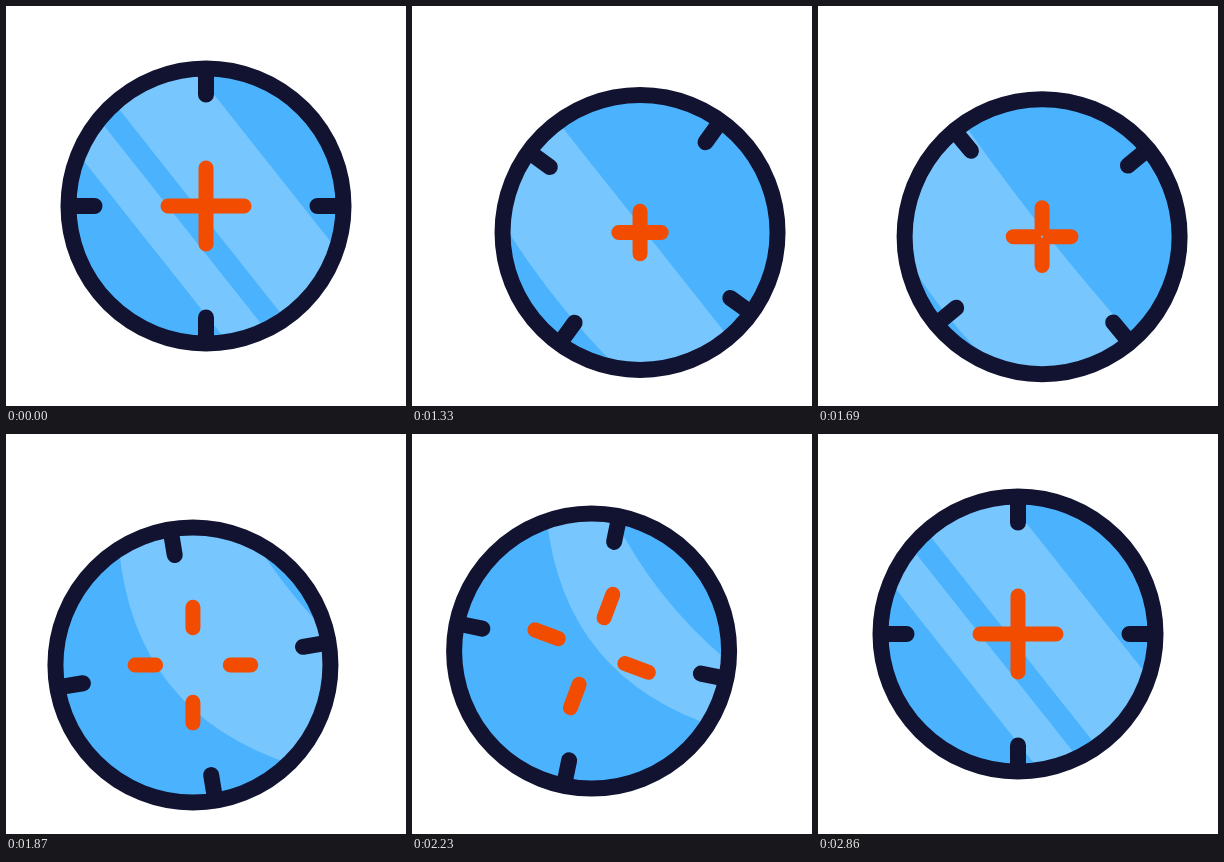
Write an HTML page that moves like this. It is 400 px wide and 400 px high and loops after 2950 ms.

```html
<!DOCTYPE html>
<html lang="en">
<head>
<meta charset="utf-8">
<title>Crosshair</title>
<style>
  html, body { margin: 0; width: 100%; height: 100%; overflow: hidden; background: #fff; }
  svg { display: block; width: 100%; height: 100%; }
  .glass { fill: #4bb3fd; }
  .light { fill: #78c6fe; }
  .ring, .tick { fill: none; stroke: #121331; stroke-width: 16; stroke-linecap: round; }
  .dash { fill: none; stroke: #f24c00; stroke-width: 15; stroke-linecap: round; }
</style>
</head>
<body>
<svg viewBox="0 0 400 400">
  <defs><clipPath id="lens"><circle r="133"/></clipPath></defs>
  <g id="scope">
    <circle class="glass" r="133"/>
    <g clip-path="url(#lens)">
      <g transform="rotate(-38.4)">
        <path id="narrow" class="light"/>
        <path id="wide" class="light"/>
      </g>
    </g>
    <circle class="ring" r="137.5"/>
    <path id="ticks" class="tick" d="M0-137V-111.5M0 137V111.5M-137 0H-111.5M137 0H111.5"/>
    <path id="cross" class="dash"/>
  </g>
</svg>
<script>
const LOOP = 2950, START = 1030, STEP = 30, LAST = 2860;

// Three eased legs: aim right, sweep left, return.
// Each property follows a Bezier curve through its control values.
const legs = [
  {
    from: 1000, to: 1450, ease: [1, 1.5],
    x: [200, 209, 231, 228.2], y: [200, 207.5, 226, 228.2],
    inner: [0], length: [38, 33.7, 20.5, 20.5],
    spin: [0, 41.7], turn: [0],
    slide: [0, 0, -60, -145],
    left: [-8, -8, -34, -150], right: [75.5, 75.5, 62, -29],
    bowL: [0, 12], bowR: [0]
  },
  {
    from: 1500, to: 2080, ease: [2.9, 4.75],
    x: [228.2, 225, 192.4, 172], y: [228.2, 233.5, 235.8, 226.4],
    inner: [0, 48], length: [20.5],
    spin: [41.7, 91.7], turn: [0],
    slide: [-145],
    left: [-150, 4], right: [-29, 28, 144, 130],
    bowL: [12, 18, 54], bowR: [0, 20]
  },
  {
    from: 2080, to: 2860, ease: [1.8, 5.7],
    x: [172, 182, 191, 200], y: [226.4, 212.5, 207, 200],
    inner: [48, 0], length: [20.5, 38],
    spin: [91.7, 102, 180], turn: [0, 37.5, 90],
    slide: [-145, 0],
    left: [4, 10, -8], right: [130, 60, 75.5, 75.5],
    bowL: [54, 0], bowR: [20, 20, 0]
  }
];

const byId = id => document.getElementById(id);
const [scope, ticks, cross, narrow, wide] =
  ['scope', 'ticks', 'cross', 'narrow', 'wide'].map(byId);

// Slow start grows with a, slow finish grows with b
const ease = (u, [a, b]) => 1 - (1 - u ** a) ** b;

function bezier(points, p) {
  if (points.length === 1) return points[0];
  const next = points.slice(1).map((v, i) => points[i] + (v - points[i]) * p);
  return bezier(next, p);
}

// Upright band whose sides bend by bow at a distance of 129 from the middle
function band(left, right, bowL = 0, bowR = 0) {
  const s = 140, bend = (s / 129) ** 2;
  const side = (m, bow, dir) =>
    `${m + bow * bend} ${-s * dir}Q${m - bow * bend} 0 ${m + bow * bend} ${s * dir}`;
  return `M${side(left, bowL, 1)}L${side(right, bowR, -1)}Z`;
}

function draw(t) {
  const leg = legs.findLast(l => t >= l.from) || legs[0];
  const u = Math.max(0, Math.min(1, (t - leg.from) / (leg.to - leg.from)));
  const p = ease(u, leg.ease);
  const at = name => bezier(leg[name], p);

  const a = at('inner'), b = a + at('length'), slide = at('slide');
  scope.setAttribute('transform', `translate(${at('x')} ${at('y')})`);
  ticks.setAttribute('transform', `rotate(${at('spin')})`);
  cross.setAttribute('transform', `rotate(${at('turn')})`);
  cross.setAttribute('d', `M0 ${-a}V${-b}M0 ${a}V${b}M${-a} 0H${-b}M${a} 0H${b}`);
  narrow.setAttribute('d', band(slide - 67.7, slide - 30));
  wide.setAttribute('d', band(at('left'), at('right'), at('bowL'), at('bowR')));
}

function tick() {
  const t = performance.now() % LOOP;
  const held = START + Math.floor((t - START) / STEP) * STEP;
  draw(t < START ? 0 : Math.min(held, LAST));
  requestAnimationFrame(tick);
}
tick();
</script>
</body>
</html>
```
